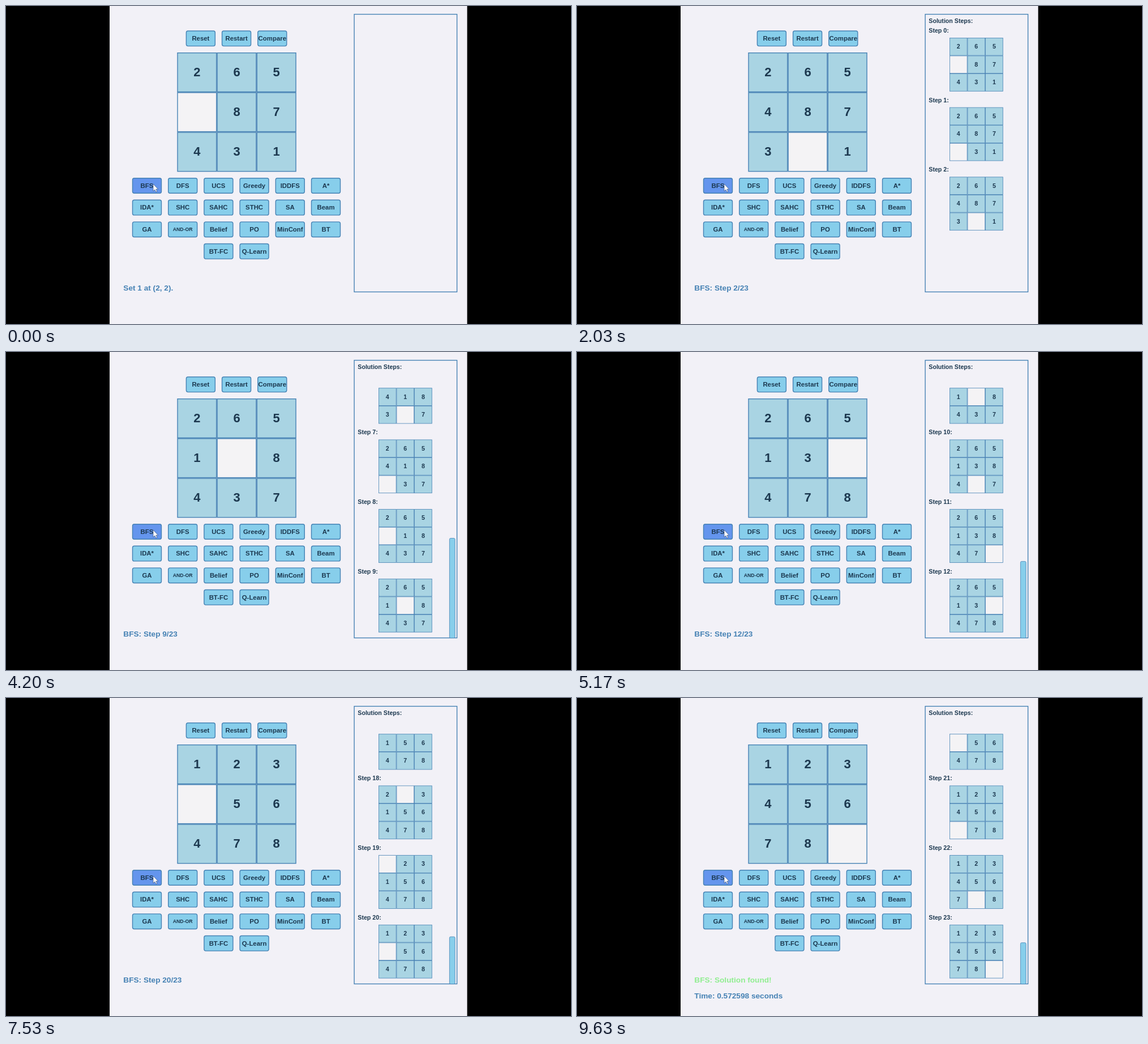
These frames come from a looping animation (998x561 px, 9660 ms). An HTML page:

```html
<!DOCTYPE html>
<html lang="en">
<head>
<meta charset="utf-8">
<title>Sliding puzzle solver</title>
<style>
  html, body { margin: 0; width: 100%; height: 100%; overflow: hidden; background: #000; }
  svg { display: block; width: 100%; height: 100%; }
  text { font-family: "Liberation Sans", Arial, sans-serif; font-weight: bold; fill: #1c384f; }
</style>
</head>
<body>
<svg viewBox="0 0 998 561">
  <rect width="998" height="561" fill="#000"/>
  <rect x="183" width="631.6" height="561" fill="#f2f1f7"/>
  <g id="buttons"></g>
  <g id="board"></g>
  <rect x="615.1" y="14.6" width="181.5" height="489.8" fill="#f2f1f7" stroke="#4682b4" stroke-width="1.4"/>
  <g id="panel"></g>
  <g id="status"></g>
  <path d="M260 314v12.6l2.9-2.6 2 4.2 2-.9-2-4.1h3.8z" fill="#fff" stroke="#34507c" stroke-width=".7"/>
</svg>
<script>
const LOOP = 9660, SHOW = 900, START = 1310, STEP = 303, LAST = 23;
const FOUND = START + STEP * (LAST + 1);
const BLUE = '#4682b4', GREEN = '#90ee90';
const PITCH = 122.7;

// Each state follows from moving the blank along this path.
const blanks = [...'367854763478521452103678'].map(Number);
const states = [[...'265087431']];
for (let i = 1; i <= LAST; i++) {
  const s = [...states[i - 1]], from = blanks[i - 1], to = blanks[i];
  s[from] = s[to];
  s[to] = '0';
  states.push(s);
}

const $ = id => document.getElementById(id);

function text(str, x, y, size, anchor = 'start', fill = '') {
  const style = fill ? ` style="fill:${fill}"` : '';
  return `<text x="${x}" y="${y}" font-size="${size}" text-anchor="${anchor}"${style}>${str}</text>`;
}

function rect(x, y, w, h, fill, line, r = 0) {
  const k = line / 2;
  return `<rect x="${x + k}" y="${y + k}" width="${w - line}" height="${h - line}" rx="${r}" ` +
    `fill="${fill}" stroke="${BLUE}" stroke-width="${line}"/>`;
}

function button(label, x, y) {
  const size = label === 'AND-OR' ? 8.75 : 11.4;
  const fill = label === 'BFS' ? '#6495ed' : '#87ceeb';
  return rect(x, y, 52.4, 28, fill, 1.4, 3) +
    text(label, x + 26.2, y + 14 + size * 0.34, size, 'middle');
}

function grid(state, x, y, cell, size, line, minY = 0) {
  return state.map((n, i) => {
    const cx = x + (i % 3) * cell, cy = y + Math.floor(i / 3) * cell;
    if (cy < minY) return '';
    const box = rect(cx, cy, cell, cell, n === '0' ? '#f4f3f5' : '#a9d4e3', line);
    return n === '0' ? box :
      box + text(n, cx + cell / 2, cy + cell / 2 + size * 0.32, size, 'middle');
  }).join('');
}

function panel(step) {
  const scroll = step < 3 ? 0 : (step - 3) * PITCH + 24.2;
  let out = text('Solution Steps:', 621.3, 29.7, 10.65);
  for (let i = Math.max(0, step - 3); i <= step; i++) {
    const y = 43 + i * PITCH - scroll;
    if (y > 35) out += text(`Step ${i}:`, 621.3, y + 3.9, 10.65);
    out += grid(states[i], 658, y + 13, 31.55, 10.65, 0.8, 38);
  }
  if (step >= 3) {
    const h = 1768 / (step + 1);
    out += rect(783, 505 - h, 10.5, h, '#87ceeb', 0.8, 2);
  }
  return out;
}

function status(step, found) {
  const line = (str, y, fill) => text(str, 207.3, y, 13.65, 'start', fill);
  if (found) return line('BFS: Solution found!', 502, GREEN) + line('Time: 0.572598 seconds', 530, BLUE);
  return line(step < 0 ? 'Set 1 at (2, 2).' : `BFS: Step ${step}/${LAST}`, 502, BLUE);
}

function drawButtons() {
  const rows = [
    'BFS DFS UCS Greedy IDDFS A*',
    'IDA* SHC SAHC STHC SA Beam',
    'GA AND-OR Belief PO MinConf BT',
    'BT-FC Q-Learn'
  ];
  const row = (labels, x, y) =>
    labels.split(' ').map((label, i) => button(label, x + i * 63.2, y)).join('');
  $('buttons').innerHTML = row('Reset Restart Compare', 317.7, 43.3) +
    rows.map((labels, i) => row(labels, i === 3 ? 349.2 : 222.8, 303 + i * 38.6)).join('');
}

let shown = '';
function render(t) {
  const step = t < SHOW ? -1 : Math.min(LAST, Math.max(0, Math.floor((t - START) / STEP)));
  const found = t >= FOUND;
  const key = step + ':' + found;
  if (key === shown) return;
  shown = key;
  $('board').innerHTML = grid(states[Math.max(0, step)], 302.3, 82, 70.15, 22, 1.4);
  $('panel').innerHTML = step < 0 ? '' : panel(step);
  $('status').innerHTML = status(step, found);
}

drawButtons();
render(0);
const origin = performance.now();
function tick() {
  render((performance.now() - origin) % LOOP);
  requestAnimationFrame(tick);
}
requestAnimationFrame(tick);
</script>
</body>
</html>
```
